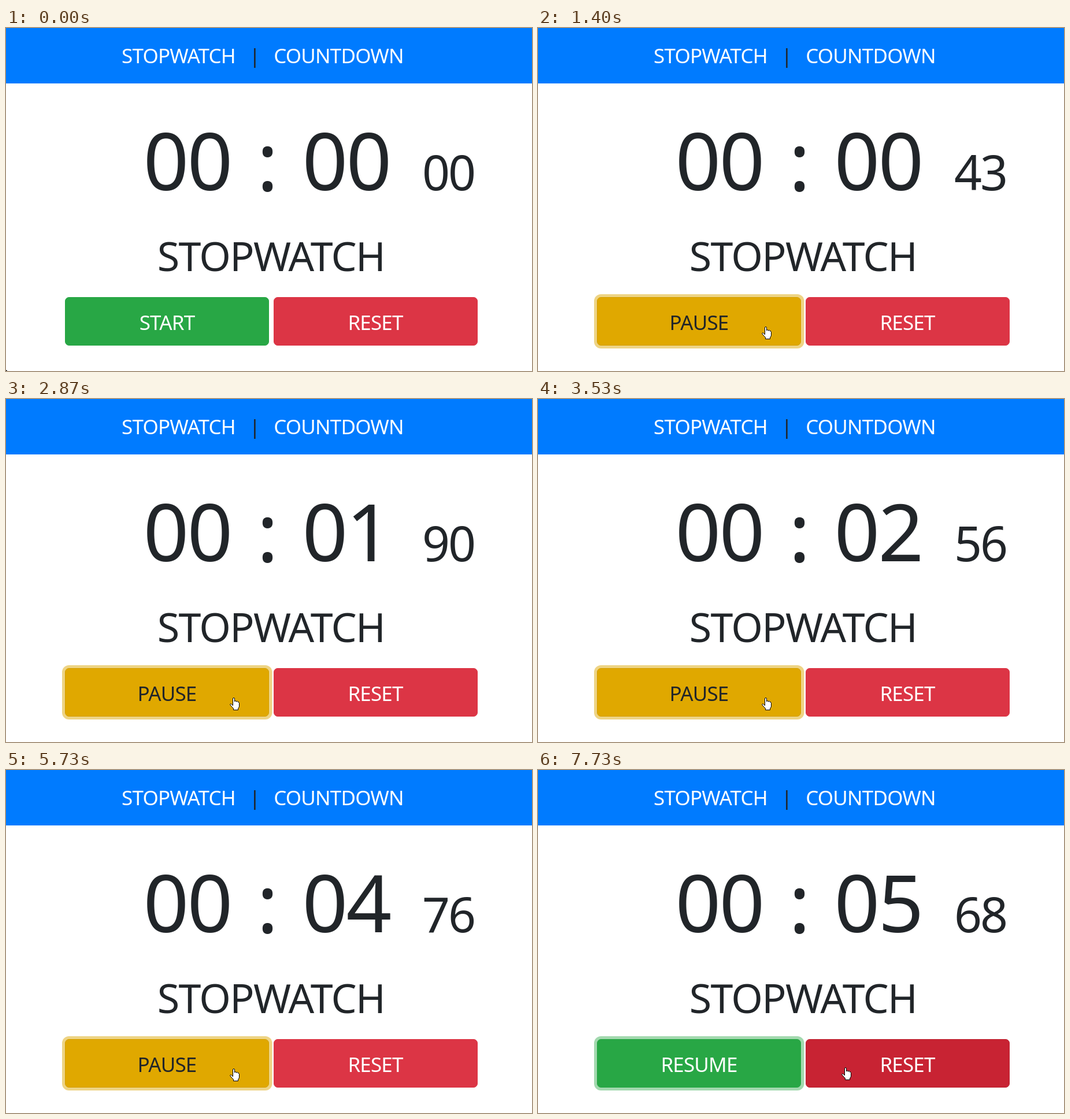
Recreate the animation shown at these times as an HTML page. Size 910 px wide and 594 px high, loop 8000 ms.

```html
<!DOCTYPE html>
<html lang="en">
<head>
<meta charset="utf-8">
<title>Stopwatch</title>
<style>
  html, body { margin: 0; width: 100%; height: 100%; overflow: hidden; background: #fff; }
  svg { display: block; width: 100%; height: 100%; }
  text { font: 35px "Noto Sans", "Open Sans", sans-serif; letter-spacing: -.024em; text-anchor: middle; fill: #212529; }
  .light { fill: #fff; }
  .title { font-size: 70px; }
  .big { font-size: 138px; letter-spacing: 0; }
  .small { font-size: 84px; letter-spacing: 0; }
  .colon { font-size: 140px; font-weight: 300; letter-spacing: 0; }
  .pointer { fill: #fff; stroke: #000; stroke-linejoin: round; }
</style>
</head>
<body>
<svg viewBox="0 0 910 594">
  <rect width="910" height="96" fill="#007bff"/>
  <text class="light" x="298.5" y="61">STOPWATCH</text>
  <text x="430" y="61">|</text>
  <text class="light" x="575.5" y="61">COUNTDOWN</text>

  <g id="digits"></g>
  <text class="colon" x="452.5" y="281.5">:</text>
  <text class="title" x="458.5" y="421">STOPWATCH</text>

  <rect id="ring" x="97" y="461" width="363.5" height="94" rx="12"/>
  <rect id="main" x="102.5" y="466.5" width="352" height="83" rx="6.5"/>
  <text id="label" x="278.5" y="523"></text>
  <rect id="reset" x="463.5" y="466.5" width="352" height="83" rx="6.5"/>
  <text class="light" x="639" y="523">RESET</text>

  <g id="cursor" class="pointer">
    <path id="arrow" d="M.5 .5V16.5L4.5 13L7 19.5L9.5 18.5L7 12.5H12Z"/>
    <path id="hand" transform="translate(-8 -1)" d="M5.5 13V2a1.5 1.5 0 0 1 3 0v5a1.5 1.5 0 0 1 3 .5a1.5 1.5 0 0 1 3 .8a1.2 1.2 0 0 1 2 1V15q0 2-2 4v2.5h-8V19L1 13q-1-1.5 .5-2t4 3Z"/>
  </g>
</svg>
<script>
const LOOP = 8000, FPS = 15, FADE = 150;
const START_CLICK = 975, PAUSE_CLICK = 6655, COUNT_START = 970, COUNT_END = 568;

// Each colour track is a list of [start time, colour]; every change fades in.
const mainFill = [[0, '#28a745'], [470, '#218838'], [910, '#1e7e34'], [START_CLICK, '#e0a800'],
  [6560, '#d39e00'], [PAUSE_CLICK, '#218838'], [7410, '#28a745']];
const mainEdge = [[0, '#28a745'], [470, '#1e7e34'], [START_CLICK, '#d39e00'],
  [PAUSE_CLICK, '#1e7e34'], [7410, '#28a745']];
const ringFill = [[0, '#48b46100'], [910, '#48b46180'], [START_CLICK, '#deaa0c80'], [PAUSE_CLICK, '#48b46180']];
const labelFill = [[0, '#ffffff'], [START_CLICK, '#212529'], [PAUSE_CLICK, '#ffffff']];
const resetFill = [[0, '#dc3545'], [7430, '#c82333']];
const resetEdge = [[0, '#dc3545'], [7430, '#bd2130']];

const $ = id => document.getElementById(id);
const lerp = (a, b, p) => a + (b - a) * p;
const smooth = u => { u = Math.min(1, Math.max(0, u)); return u * u * (3 - 2 * u); };

const channels = hex => hex.padEnd(9, 'f').slice(1).match(/../g).map(c => parseInt(c, 16));
function colorAt(track, t) {
  const [r, g, b, a] = track.reduce((color, [start, hex], i) => {
    const p = i ? smooth((t - start) / FADE) : 1;
    return channels(hex).map((c, k) => lerp(color[k], c, p));
  }, [0, 0, 0, 0]);
  return `rgba(${r},${g},${b},${a / 255})`;
}

const digits = [277, 353, 552, 628, 744, 789].map((x, i) => {
  const node = document.createElementNS('http://www.w3.org/2000/svg', 'text');
  node.setAttribute('class', i < 4 ? 'big' : 'small');
  node.setAttribute('x', x);
  node.setAttribute('y', 281);
  return $('digits').appendChild(node);
});

function pointerAt(t) {
  if (t < 7000) {
    const p = smooth((t - 140) / 600);
    return [lerp(0, 395, p), lerp(592, 518, p)];
  }
  const p = smooth((t - 7140) / 590);
  return [lerp(395, 533, p), lerp(518, 516, p) + 14 * Math.sin(Math.PI * p)];
}

function draw(t) {
  const count = Math.min(COUNT_END, Math.max(0, Math.floor((t - COUNT_START) / 10)));
  const clock = '00' + String(count).padStart(4, '0');
  digits.forEach((node, i) => node.textContent = clock[i]);

  $('main').setAttribute('fill', colorAt(mainFill, t));
  $('main').setAttribute('stroke', colorAt(mainEdge, t));
  $('ring').setAttribute('fill', colorAt(ringFill, t));
  $('reset').setAttribute('fill', colorAt(resetFill, t));
  $('reset').setAttribute('stroke', colorAt(resetEdge, t));
  $('label').style.fill = colorAt(labelFill, t);
  $('label').textContent = t < START_CLICK ? 'START' : t < PAUSE_CLICK ? 'PAUSE' : 'RESUME';

  const [x, y] = pointerAt(t).map(Math.round);
  const overButton = y > 465 && y < 550 && (x > 101 && x < 455 || x > 462 && x < 816);
  $('cursor').setAttribute('transform', `translate(${x} ${y})`);
  $('hand').style.display = overButton ? '' : 'none';
  $('arrow').style.display = overButton ? 'none' : '';
}

const origin = performance.now();
function tick() {
  const elapsed = (performance.now() - origin) % LOOP;
  const step = Math.floor((elapsed + 4) * FPS / 1000);
  draw(Math.round(step * 100 / FPS) * 10);
  requestAnimationFrame(tick);
}
tick();
</script>
</body>
</html>
```
